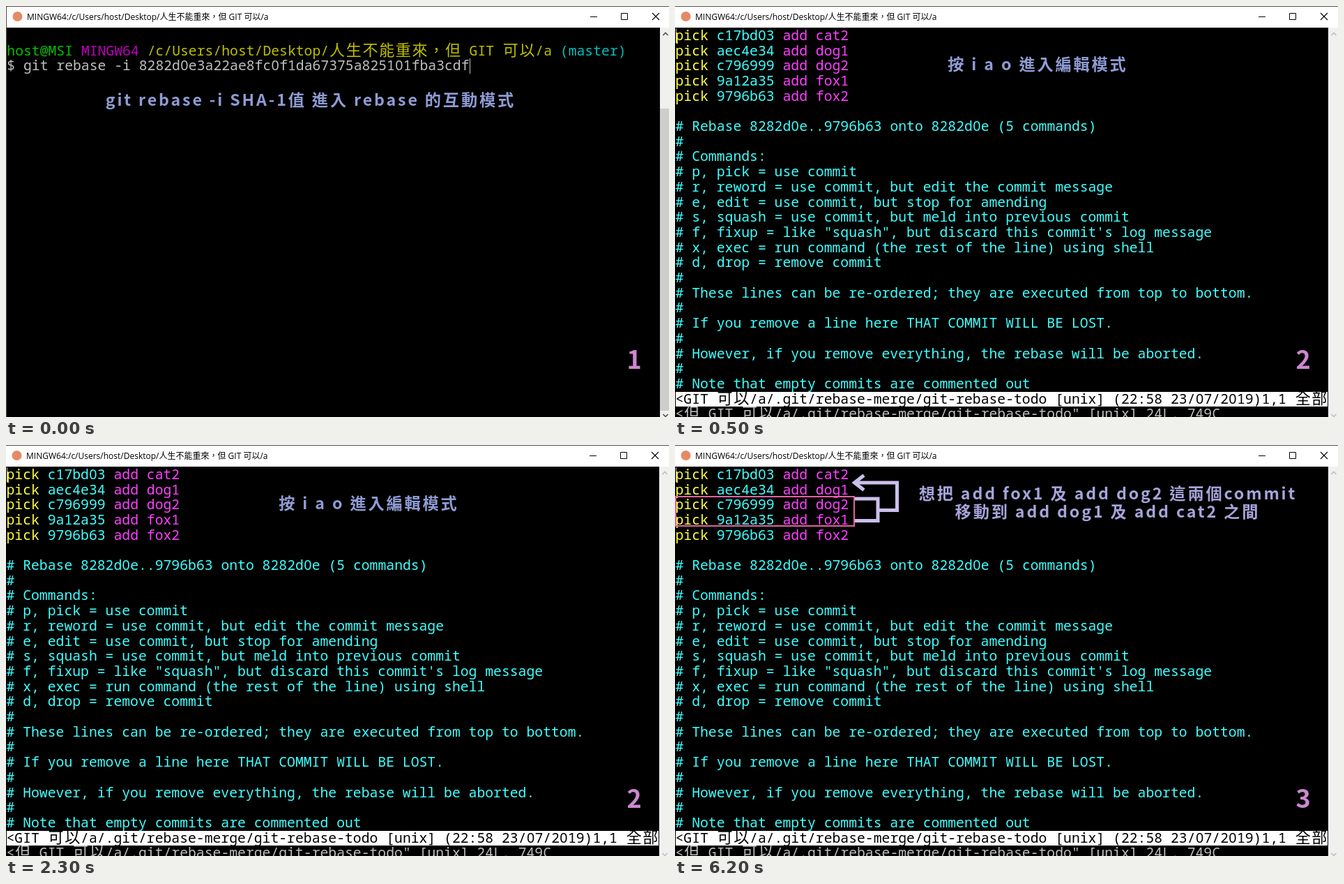
These frames come from a looping animation (951 by 589 pixels, 8000 ms). An HTML page:

```html
<!DOCTYPE html>
<html lang="zh-Hant">
<head>
<meta charset="utf-8">
<title>Interactive rebase</title>
<style>
html, body { margin: 0; width: 100%; height: 100%; overflow: hidden; background: #000; }
svg { display: block; width: 951px; height: 589px; }
text { white-space: pre; }
.term { font: 500 19.74px "Noto Sans Mono", monospace; }
.wide { font: 300 22px "Noto Sans CJK TC", "Noto Sans CJK", sans-serif; }
.zero { font-family: "Noto Sans", sans-serif; }
.bar { font: 12px "Open Sans", "Noto Sans CJK TC", "Noto Sans CJK", sans-serif; fill: #000; }
.note { font: 700 23.2px "Noto Sans CJK TC", "Noto Sans CJK", sans-serif; letter-spacing: 2.85px; text-anchor: middle; }
.step { font: 700 36px "Noto Sans CJK TC", "Noto Sans CJK", sans-serif; text-anchor: middle; fill: #cc88d0; }
</style>
</head>
<body>
<svg id="stage" viewBox="0 0 951 589"></svg>
<script>
const CELL = 11.844, ROW = 21.7, BASE = 48.8;
const GREEN = '#00bf00', PURPLE = '#bf00bf', OLIVE = '#bfbf00', TEAL = '#00bfbf', GRAY = '#bfbfbf';
const YELLOW = '#ffff40', CYAN = '#40ffff', PINK = '#ff40ff';
const stage = document.getElementById('stage');

function add(parent, tag, attrs = {}, text) {
  const node = document.createElementNS('http://www.w3.org/2000/svg', tag);
  for (const key in attrs) node.setAttribute(key, attrs[key]);
  if (text !== undefined) node.textContent = text;
  return parent.appendChild(node);
}

const rect = (g, x, y, width, height, fill) => add(g, 'rect', { x, y, width, height, fill });
const line = (g, d, stroke, width = 1) =>
  add(g, 'path', { d, stroke, 'stroke-width': width, fill: 'none' });

// Writes coloured runs on the terminal grid; CJK characters take two cells.
function print(g, left, row, ...runs) {
  const text = add(g, 'text', { class: 'term', y: Math.round(BASE + row * ROW) });
  let col = 0;
  for (const [fill, string] of runs) {
    for (const part of string.match(/0|[\u3000-\uffef]|[^0\u3000-\uffef]+/g)) {
      const wide = part > '\u3000', zero = part === '0';
      const attrs = { x: (left + col * CELL + (wide ? 0.85 : zero ? 0.28 : 0)).toFixed(2), fill };
      if (wide || zero) attrs.class = wide ? 'wide' : 'zero';
      add(text, 'tspan', attrs, part);
      col += wide ? 2 : part.length;
    }
  }
}

function note(g, x, y, fill, string) {
  add(g, 'text', { class: 'note', x: x + 1.4, y, fill }, string);
}

function step(g, n) {
  add(g, 'text', { class: 'step', x: 901, y: 520 }, n);
}

function windowFrame(g, dx, scrollable) {
  rect(g, 0, 0, 951, 589, '#505050');
  rect(g, dx, 1, 951, 588, '#000');
  rect(g, dx, 1, 951, 30, '#fff');
  const w = add(g, 'g', { transform: `translate(${dx - 1})` });
  add(w, 'circle', { cx: 16.5, cy: 15, r: 7, fill: '#e58a66' });
  add(w, 'text', { class: 'bar', x: 30, y: 20 }, 'MINGW64:/c/Users/host/Desktop/人生不能重來，但 GIT 可以/a');
  line(w, 'M838 15.5h10M882.5 10.5h9v9h-9z', '#000');
  line(w, 'M927 10l10 10m0-10l-10 10', '#000', 1.1);
  rect(w, 938, 31, 15, 558, '#f0f0f0');
  if (scrollable) rect(w, 938, 147, 15, 433, '#cdcdcd');
  const arrow = scrollable ? '#505050' : '#bfbfbf';
  line(w, 'M942.5 42l3.5-3.5 3.5 3.5', arrow, 1.6);
  line(w, 'M942.5 585l3.5 3.5 3.5-3.5', arrow, 1.6);
}

function shell(g) {
  windowFrame(g, 1, true);
  print(g, 1.3, 1, [GREEN, 'host@MSI '], [PURPLE, 'MINGW64 '],
    [OLIVE, '/c/Users/host/Desktop/人生不能重來，但 GIT 可以/a '], [TEAL, '(master)']);
  print(g, 1.3, 2, [GRAY, '$ git rebase -i 8282d0e3a22ae8fc0f1da67375a825101fba3cdf']);
  rect(g, 665, 75, 1, 22, GRAY);
  note(g, 435.5, 143, '#8f9cd4', 'git rebase -i SHA-1值 進入 rebase 的互動模式');
  step(g, 1);
}

const picks = ['c17bd03 cat2', 'aec4e34 dog1', 'c796999 dog2', '9a12a35 fox1', '9796b63 fox2'];
const help = `# Rebase 8282d0e..9796b63 onto 8282d0e (5 commands)
#
# Commands:
# p, pick = use commit
# r, reword = use commit, but edit the commit message
# e, edit = use commit, but stop for amending
# s, squash = use commit, but meld into previous commit
# f, fixup = like "squash", but discard this commit's log message
# x, exec = run command (the rest of the line) using shell
# d, drop = remove commit
#
# These lines can be re-ordered; they are executed from top to bottom.
#
# If you remove a line here THAT COMMIT WILL BE LOST.
#
# However, if you remove everything, the rebase will be aborted.
#
# Note that empty commits are commented out`.split('\n');

function editor(g) {
  windowFrame(g, 0, false);
  picks.forEach((pick, i) => {
    const [hash, name] = pick.split(' ');
    print(g, 0.5, i, [YELLOW, 'pick '], [CYAN, hash], [PINK, ' add ' + name]);
  });
  help.forEach((string, i) => print(g, 0.5, i + 6, [CYAN, string]));
  rect(g, 1, 553, 935, 21, '#fff');
  print(g, 0.5, 24, ['#000', '<GIT 可以/a/.git/rebase-merge/git-rebase-todo [unix] (22:58 23/07/2019)1,1 全部']);
  print(g, 0.5, 25, [GRAY, '<但 GIT 可以/a/.git/rebase-merge/git-rebase-todo" [unix] 24L, 749C']);
  rect(g, 1, 32, 1, 21, GRAY);
}

function editHint(g) {
  note(g, 519, 92, '#8f9cd4', '按 i a o 進入編輯模式');
  step(g, 2);
}

function moveHint(g) {
  const lilac = '#cbbfec';
  add(g, 'rect', { x: 1, y: 74, width: 256, height: 42, fill: 'none', stroke: '#e0649c', 'stroke-width': 2 });
  line(g, 'M258 77H291V108.5H258M291 93.5H318.5V54H258', lilac, 5);
  line(g, 'M271 43.5L257.5 54L271 64.5', lilac, 5);
  note(g, 619.5, 78, '#a6a4da', '想把 add fox1 及 add dog2 這兩個commit');
  note(g, 619, 104, '#a6a4da', '移動到 add dog1 及 add cat2 之間');
  step(g, 3);
}

const LOOP = 8000;
const layers = [[shell, 0, 500], [editor, 500, LOOP], [editHint, 500, 3500], [moveHint, 3500, LOOP]]
  .map(([draw, from, to]) => {
    const g = add(stage, 'g');
    draw(g);
    return { g, from, to };
  });

function render(t) {
  for (const { g, from, to } of layers) {
    g.setAttribute('display', t >= from && t < to ? 'inline' : 'none');
  }
}

const start = performance.now();
function tick() {
  render((performance.now() - start) % LOOP);
  requestAnimationFrame(tick);
}
tick();
</script>
</body>
</html>
```
